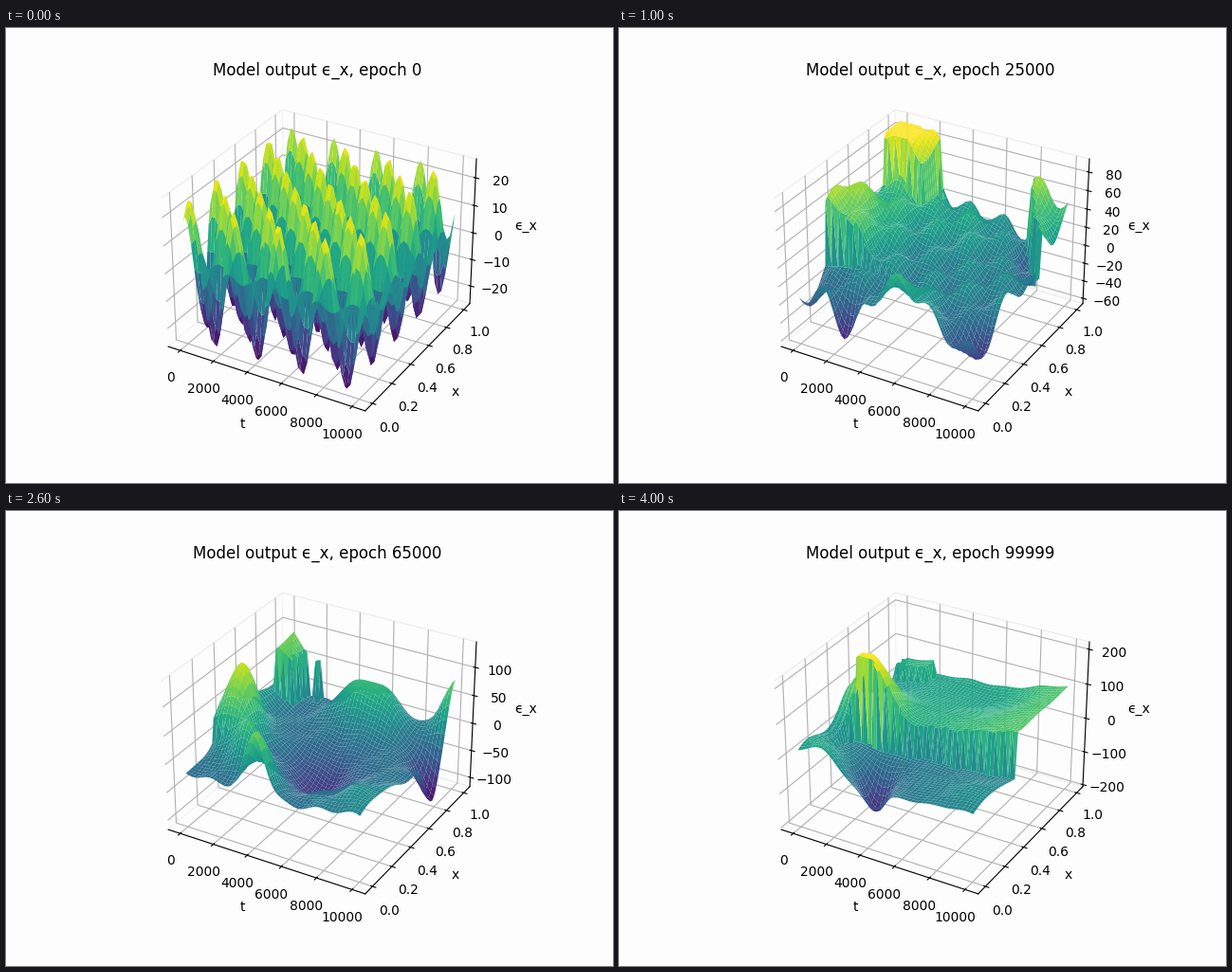
A matplotlib script for the animation above (4100 ms loop, 640 by 480 pixels).

```python
import numpy as np
import matplotlib.pyplot as plt
from matplotlib.animation import FuncAnimation

FRAMES, STEP_MS = 41, 100
N = 50
PAPER = "#fdfdfd"
FILL = 0.96     # share of the z axis taken by the data

# s runs along t, r along x; heights are fractions of the data range, -0.5..0.5
S, R = np.meshgrid(np.linspace(0, 1, N), np.linspace(0, 1, N))

# uneven copies of the grid give the cliffs their comb-like teeth
rng = np.random.default_rng(3)
TS = S + rng.uniform(-0.012, 0.012, N)[:, None]
TR = R + rng.uniform(-0.02, 0.02, N)[None, :]


def bump(s, r, h, ws, wr=None):
    """Round hill (or pit) of height h."""
    return h * np.exp(-((S - s) / ws) ** 2 - ((R - r) / (wr or ws)) ** 2)


def cliff(d, solid=1):
    """0 to 1 step where d > 0, melting into a soft slope where solid is 0."""
    soft = 1 / (1 + np.exp(-d / 0.08))
    return soft + ((d > 0) - soft) * solid


def ripple(i):
    """Remains of the first waves, dying out with training."""
    phase = (S + 0.06 - 0.08 * R) / 0.205
    return 0.08 * np.exp((7 - i) / 12) * np.cos(2 * np.pi * phase) * np.cos(6 * np.pi * R)


def waves():
    return 0.5 * np.cos(2 * np.pi * (S - 0.03) / 0.255) * np.cos(2 * np.pi * (R - 0.015) / 0.25)


def rim():
    wall = cliff(TR - 0.45 - 0.43 * np.sin(np.pi * S), np.clip(S / 0.15, 0, 1))
    patch = (abs(TS - 0.61) < 0.2) * np.exp(-(R / 0.25) ** 2)
    return (-0.02 - 0.15 * R + 0.45 * wall + 0.36 * patch
            + bump(0.03, 0.95, 0.1, 0.1) + bump(0.53, 1, 0.17, 0.15)
            + bump(0.95, 0.9, -0.2, 0.12) + bump(0.15, 0.38, 0.22, 0.13)
            + bump(0.15, 0, 0.1, 0.1))


def blocks():
    plateau = cliff(TR - 0.26) * np.exp(-(S / 0.24) ** 2)
    back = (TS < 0.26) & (TR > 0.82)
    corner = TR > 1 - 1.45 * (TS - 0.78)
    return (-0.06 + 0.42 * plateau + 0.3 * back + 0.4 * corner
            + bump(0, 0.1, -0.22, 0.12) + bump(0.28, 0, -0.28, 0.09)
            + bump(0, 0.72, -0.25, 0.15) + bump(0.6, 0, 0.2, 0.13)
            + bump(0.95, 0.1, -0.25, 0.12) + bump(0.5, 0.8, 0.12, 0.2)
            + bump(1, 0.85, -0.28, 0.16))


def shelf():
    edge = 0.44 - 0.14 * np.sin(np.pi * R / 0.8)
    left = (edge > TS) * (0.9 * R - 0.35)
    notch = (TS < 0.1) & (R < 0.04)
    return (-0.07 + left - 0.2 * notch + (0.5 - 0.75 * R) * np.exp(-(S / 0.5) ** 4)
            + bump(0.55, 0, 0.2, 0.1) + bump(0.42, 0.5, -0.14, 0.12)
            + bump(0.05, 0.9, 0.2, 0.13) + bump(0.22, 0.38, 0.2, 0.1)
            + bump(1, 0.75, -0.3, 0.11) + bump(0.75, 0.7, 0.1, 0.17)
            + bump(0.12, 0, 0.1, 0.1))


def hill():
    step = cliff(TR - 0.25) * np.exp(-(S / 0.1) ** 2)
    block = (abs(TS - 0.08) < 0.05) & (TR > 0.82)
    spike = (abs(TS - 0.19) < 0.012) & (R > 0.95)
    return (-0.13 + 0.15 * step + 0.3 * block + 0.27 * spike
            + bump(0.1, 0.4, 0.5, 0.1, 0.14) + bump(0.24, 0.22, 0.3, 0.1)
            + bump(0.41, 0.02, 0.42, 0.08, 0.12) + bump(0.55, 0.4, -0.2, 0.18)
            + bump(0.45, 0.9, 0.22, 0.12) + bump(0.63, 0.9, 0.26, 0.14)
            + bump(1, 0.77, -0.33, 0.1) + bump(1, 1, 0.4, 0.1)
            + bump(0.95, 0.15, 0.12, 0.2))


def basin(start, floor):
    """High back plate torn from a low front bowl for s beyond start."""
    edge = 0.36 + 0.06 * S
    lift = 0.1 + 0.22 * S + bump(start + 0.06, 0.38, 0.5, 0.16, 0.2)
    ledge = (abs(TS - 0.12) < 0.1) & (TR > 0.9)
    return (floor + lift * cliff(TR - edge, TS > start) + 0.1 * ledge
            + bump(0, 0.1, 0.13, 0.17))


def ridge():
    return (basin(0.04, -0.13) + bump(0.26, 0.13, -0.2, 0.09)
            + bump(0.48, 0, -0.16, 0.15) + bump(0.95, 0.95, -0.22, 0.15)
            + bump(0.15, 0, 0.1, 0.1))


def scarp():
    return (basin(0.1, -0.09) + bump(0.36, 0.15, -0.27, 0.1)
            + bump(0.44, 0.02, -0.12, 0.08) + bump(0, 0.5, 0.1, 0.1)
            + bump(0.15, 0, 0.13, 0.12) + bump(0.95, 0.15, 0.08, 0.2)
            + bump(0.65, 0.85, -0.08, 0.2))


# (frame, height field, axis bottom, axis top)
KEYS = [
    (0, waves, -26.75, 26.75),
    (7, rim, -141.9, 89.4),
    (10, blocks, -66, 94),
    (17, shelf, -130.9, 125.8),
    (26, hill, -117.3, 144.6),
    (32, ridge, -147.8, 200.2),
    (40, scarp, -206, 221),
]
FIELDS = [np.clip(shape() + (ripple(i) if i else 0), -0.5, 0.5)
          for i, shape, _, _ in KEYS]


def state(i):
    """Height field and z limits, blended between the neighbouring keys."""
    k = max(n for n in range(len(KEYS) - 1) if KEYS[n][0] <= i)
    (i0, _, lo0, hi0), (i1, _, lo1, hi1) = KEYS[k], KEYS[k + 1]
    w = (i - i0) / (i1 - i0)
    if k == 0:
        w = w ** 0.5    # the first waves fade fast

    def mix(a, b):
        return a + (b - a) * w

    return mix(FIELDS[k], FIELDS[k + 1]), mix(lo0, lo1), mix(hi0, hi1)


fig = plt.figure(figsize=(6.4, 4.8), dpi=100, facecolor=PAPER)
ax = fig.add_subplot(projection="3d")
ax.set_facecolor(PAPER)
for axis in (ax.xaxis, ax.yaxis, ax.zaxis):
    axis.pane.set_facecolor(PAPER)
    axis.pane.set_edgecolor("#eeeeee")
    axis.pane.set_alpha(1)
ax.set_xlabel("t")
ax.set_ylabel("x")
ax.set_zlabel("ϵ_x")
surface = None


def draw(i):
    global surface
    if surface is not None:
        surface.remove()
    q, lo, hi = state(i)
    mid, span = (lo + hi) / 2, (hi - lo) * FILL
    surface = ax.plot_surface(S * 10000, R, mid + q * span, cmap="viridis",
                              vmin=mid - span / 2, vmax=mid + span / 2)
    pad = 0.05 + 1.1 / 48
    ax.set_xlim(-pad * 10000, (1 + pad) * 10000)
    ax.set_ylim(-pad, 1 + pad)
    ax.set_zlim(lo, hi)
    ax.set_title(f"Model output ϵ_x, epoch {min(2500 * i, 99999)}")
    return []


anim = FuncAnimation(fig, draw, frames=FRAMES, interval=STEP_MS,
                     init_func=lambda: [], repeat=True, repeat_delay=0)
plt.show()
```
